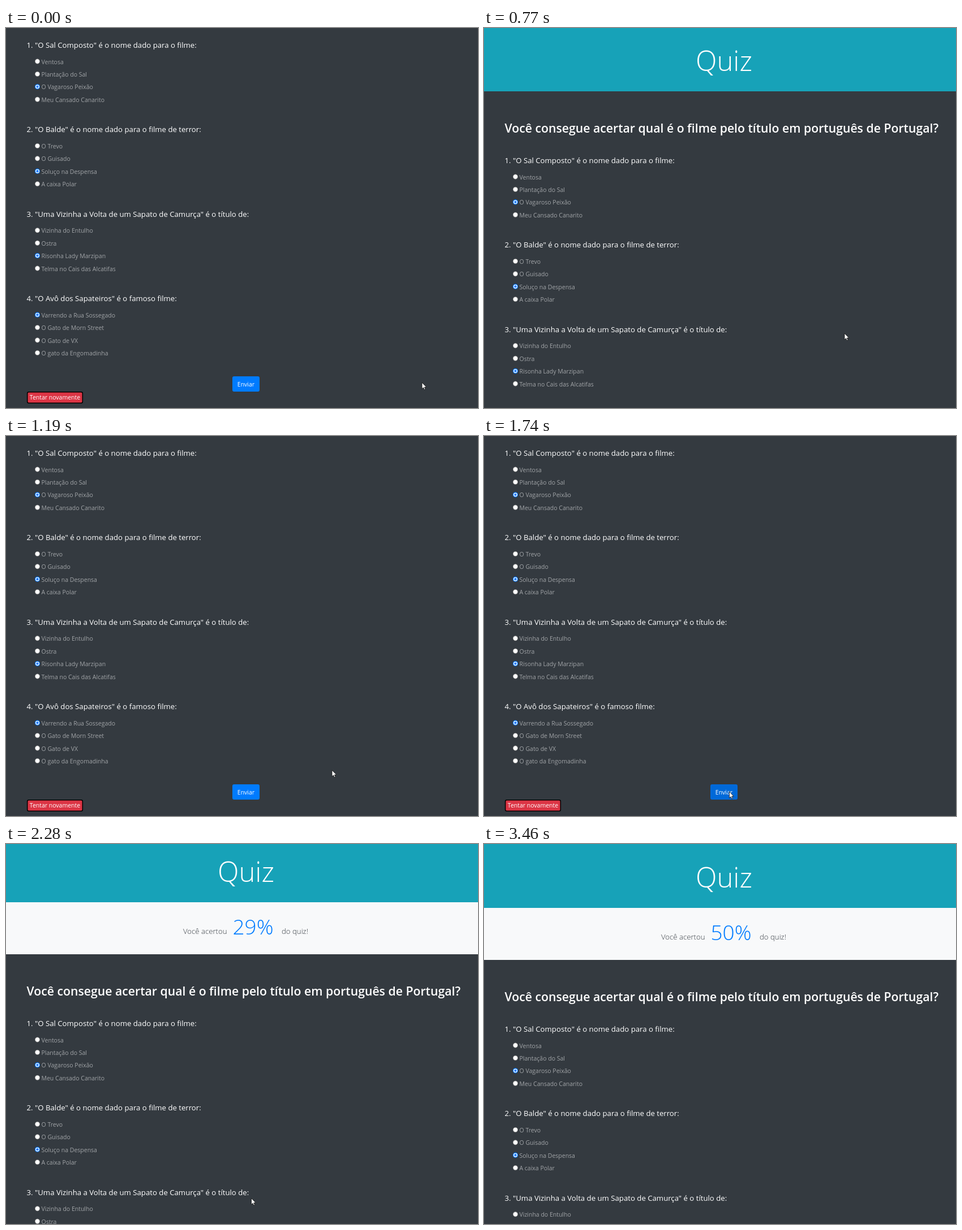
Recreate the animation shown at these times as an HTML page. Size 834 by 672 pixels, loop 4610 ms.

```html
<!DOCTYPE html>
<html lang="pt">
<head>
<meta charset="utf-8">
<title>Quiz</title>
<style>
  html, body { margin: 0; width: 100%; height: 100%; overflow: hidden; background: #343a40; }
  svg { display: block; width: 100%; height: 100%; }
  text { font-family: "Open Sans", "Noto Sans", sans-serif; fill: #fff; }
  .title { font-size: 49px; font-weight: 300; text-anchor: middle; }
  .heading { font-size: 21.23px; font-weight: 600; }
  .question { font-size: 13.2px; }
  .option { font-size: 10.5px; fill: #a1a4a7; }
  .button { font-size: 10.5px; text-anchor: middle; }
  .lead { font-size: 13.2px; font-weight: 300; fill: #343a40; }
  .count { font-size: 37px; font-weight: 300; fill: #007bff; text-anchor: middle; }
</style>
</head>
<body>
<svg id="stage" viewBox="0 0 834 672"></svg>
<script>
const LOOP = 4610;
const HEADER = 113, SCORE = 92;
const MAX_SCROLL = 205;
const SUBMIT = 1700;

const quiz = [
  ['"O Sal Composto" é o nome dado para o filme:', 2,
    ['Ventosa', 'Plantação do Sal', 'O Vagaroso Peixão', 'Meu Cansado Canarito']],
  ['"O Balde" é o nome dado para o filme de terror:', 2,
    ['O Trevo', 'O Guisado', 'Soluço na Despensa', 'A caixa Polar']],
  ['"Uma Vizinha a Volta de um Sapato de Camurça" é o título de:', 2,
    ['Vizinha do Entulho', 'Ostra', 'Risonha Lady Marzipan', 'Telma no Cais das Alcatifas']],
  ['"O Avô dos Sapateiros" é o famoso filme:', 0,
    ['Varrendo a Rua Sossegado', 'O Gato de Morn Street', 'O Gato de VX', 'O gato da Engomadinha']]
];

// Screen refreshes: first time, last time, number of steps
const refreshes = [
  [70, 570, 9], [700, 1190, 8], [1250, 1740, 8],
  [1810, 2280, 8], [2350, 2730, 6], [3180, 3460, 5]
];
const ticks = [0];
for (const [from, to, n] of refreshes)
  for (let i = 0; i < n; i++)
    ticks.push(Math.round((from + (to - from) * i / (n - 1)) / 10) * 10);

// Pointer tip: time, x, y
const pointerPath = [
  [0, 735, 627], [450, 643, 541], [600, 637, 540], [770, 637, 540], [1190, 576, 591],
  [1640, 433.5, 629], [2100, 433.5, 629], [2270, 433.5, 626.5],
  [3110, 433.5, 626.5], [3460, 542, 676]
];

const label = (cls, x, y, s) => `<text class="${cls}" x="${x}" y="${y}">${s}</text>`;
const box = (x, y, w, h, fill, more = '') =>
  `<rect x="${x}" y="${y}" width="${w}" height="${h}" fill="${fill}" ${more}/>`;

function radio(y, on) {
  const dot = (r, more) => `<circle cx="55.5" cy="${y}" r="${r}" ${more}/>`;
  return on
    ? dot(4, 'fill="#fff" stroke="#0075ff" stroke-width="1.2"') + dot(2.1, 'fill="#0075ff"')
    : dot(4.2, 'fill="#fff" stroke="#767676" stroke-width=".7"');
}

function question([text, chosen, options], i) {
  const top = 240 + i * 149.4;
  return label('question', 36.5, top, `${i + 1}. ${text}`) + options.map((name, k) => {
    const y = top + 24 + k * 22.4;
    return radio(y, k === chosen) + label('option', 62.5, y + 4.5, name);
  }).join('');
}

document.getElementById('stage').innerHTML = `
  ${box(0, 0, 834, 672, '#343a40')}
  <g id="top">
    ${box(0, -5, 834, HEADER + 5, '#17a2b8')}
    ${label('title', 424, 77, 'Quiz')}
    <g id="score">
      ${box(0, HEADER, 834, SCORE, '#f8f9fa')}
      ${label('lead', 313, 169, 'Você acertou')}
      <text id="count" class="count" x="436.5" y="170"></text>
      ${label('lead', 487, 169, 'do quiz!')}
    </g>
  </g>
  <g id="form">
    ${label('heading', 36.5, 186, 'Você consegue acertar qual é o filme pelo título em português de Portugal?')}
    ${quiz.map(question).join('')}
    ${box(400, 821, 48, 27, '#007bff', 'id="send" rx="3" stroke="#0062cc"')}
    ${label('button', 424, 838.5, 'Enviar')}
    ${box(37.7, 848.7, 97.6, 19.6, '#dc3545', 'rx="2.5" stroke="#000" stroke-width="1.5"')}
    ${label('button', 86.5, 862.3, 'Tentar novamente')}
  </g>
  <path id="pointer" d="M0 0V11.2L2.6 8.8L4.2 12.6L6 11.8L4.4 8.1H7.8Z"
    fill="#fff" stroke="#111" stroke-width=".8"/>`;

const [topPart, score, count, form, send, pointer] =
  ['top', 'score', 'count', 'form', 'send', 'pointer'].map(id => document.getElementById(id));

function ease(t, from, to) {
  const u = Math.min(1, Math.max(0, (t - from) / (to - from)));
  return (1 - Math.cos(Math.PI * u)) / 2;
}

function scrollAt(t) {
  if (t < 650) return MAX_SCROLL * (1 - ease(t, 40, 555));
  if (t < SUBMIT) return MAX_SCROLL * ease(t, 750, 1180);
  return (MAX_SCROLL + SCORE) * (1 - ease(t, 1989, 2319));
}

function pointerAt(t) {
  const i = pointerPath.findIndex(p => p[0] > t);
  if (i < 0) return pointerPath[pointerPath.length - 1].slice(1);
  const [t0, x0, y0] = pointerPath[i - 1], [t1, x1, y1] = pointerPath[i];
  const u = ease(t, t0, t1);
  return [x0 + (x1 - x0) * u, y0 + (y1 - y0) * u];
}

function draw(time) {
  const t = ticks.filter(v => v <= time).pop();
  const sent = t >= SUBMIT;
  const scroll = Math.round(scrollAt(t));
  const [x, y] = pointerAt(t);

  topPart.setAttribute('transform', `translate(0 ${-scroll})`);
  form.setAttribute('transform', `translate(0 ${(sent ? SCORE : 0) - scroll})`);
  score.setAttribute('visibility', sent ? 'visible' : 'hidden');
  count.textContent = Math.max(0, Math.min(50, Math.floor((t - SUBMIT) / 20))) + '%';

  const hover = t > 1500 && t < 2200;
  send.setAttribute('fill', hover ? '#0069d9' : '#007bff');
  send.setAttribute('stroke-width', t > SUBMIT + 100 ? 2 : 0);
  pointer.setAttribute('transform', `translate(${x} ${y})`);
}

const start = performance.now();
function loop() {
  draw((performance.now() - start) % LOOP);
  requestAnimationFrame(loop);
}
loop();
</script>
</body>
</html>
```
